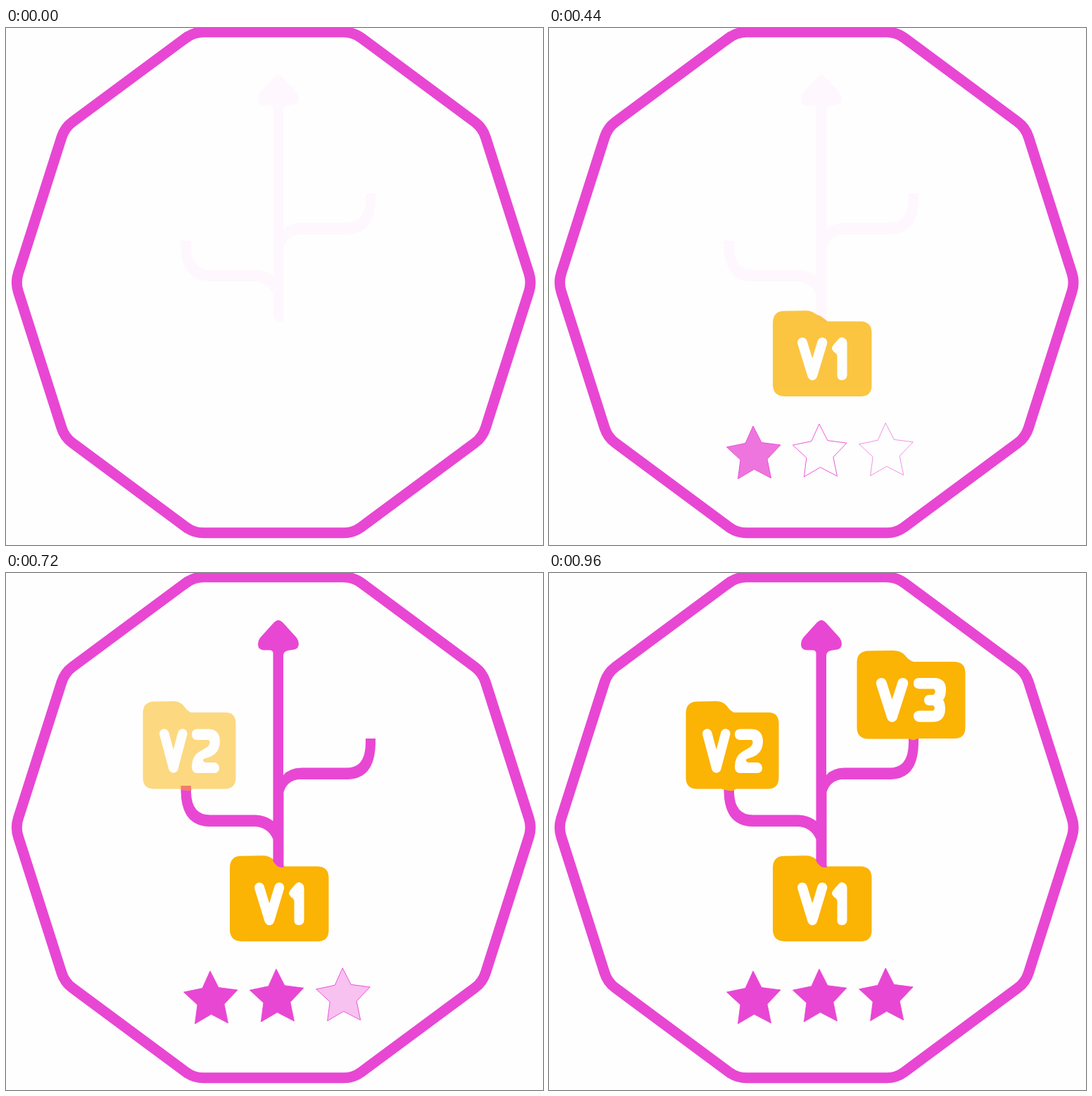
Write an HTML page that moves like this. It is 763x734 px and loops after 2880 ms.

```html
<!DOCTYPE html>
<html lang="en">
<head>
<meta charset="utf-8">
<title>Version branches</title>
<style>
  html, body { margin: 0; width: 100%; height: 100%; overflow: hidden; background: #fefefe; }
  svg { display: block; width: 100%; height: 100%; }
  .pink { fill: #e847d3; }
  .folder { fill: #fbb304; }
  .glyph { fill: #fff; }
  .vee { fill: none; stroke: #fff; stroke-linecap: round; stroke-linejoin: round; }
  .outline { fill: none; stroke: #e847d3; stroke-width: .9; }
  #frame { fill: none; stroke: #e847d3; stroke-width: 15; }
</style>
</head>
<body>
<svg viewBox="0 0 763 734" preserveAspectRatio="none">
  <path id="frame"/>
  <g id="stars"></g>
  <g id="v1" role="img" aria-label="V1">
    <path class="folder" d="M334 401.8L364 401.3Q373 401 379 406Q382 408 386 409L396 416.5L443 416.5Q458 417 458.5 432V508Q458 523 443 523H334Q318 522 318 506V418Q318.500 402 334 401.800Z"/>
    <path class="vee" stroke-width="14" d="M360 446.500L374.300 493L388.300 446.500"/>
    <path class="glyph" d="M416 439Q423 440 423.500 447V493Q423 500 416 500Q409.500 500 409.500 493V466Q409 462 405 460Q399 455 405 449L411 442Q413.500 439 416 439Z"/>
  </g>
  <path id="tree" class="pink" d="M387 67Q390 67 394 71L413 92Q416 96 416 101Q415 109 407 109L401 110Q394 111 394 118V287Q402 277 420 276.500H484Q511 277 511 240V235H525V242Q524 292 486 293H417Q400 294 394.500 311V418H391Q385 418 379.500 409V378Q372 361 354 360H288Q249 358 248.500 310V302H263V312Q264 343.500 290 343.500H355Q369 344 379.500 352V115Q380 110 375 109.500H366Q358 109 358 101Q358 96 361 92L380 71Q384 67 387 67Z"/>
  <g id="v2" role="img" aria-label="V2">
    <path class="folder" d="M210 182.500L238 182Q247 182 253 189Q257 196 263 198H312Q326 198 326.500 213V291Q326 306 312 306.500H266Q262 310 256 309Q250 308 245 306.500H210Q195 306 194.500 292V198Q195 183 210 182.500Z"/>
    <path class="vee" stroke-width="13.500" d="M224.800 228L237.800 277L250.800 228"/>
    <path class="glyph" d="M271 221.500H288Q304 222 304 240Q303 256 290 261L281 264Q278 267 283 269H297Q303 271 303 277Q303 284 296 284H270Q264 283 264 275Q264 259 276 253L286 247Q292 241 288 237H271Q264 236 264 229Q264 222 271 221.500Z"/>
  </g>
  <g id="v3" role="img" aria-label="V3">
    <path class="folder" d="M454 110.500L488 110Q500 110 506 117Q511 124 518 126H575Q591 126 591.500 141V220Q591 235 576 235H524Q518 239 512 235.500H453Q438 235 437.500 220V126Q438 111 454 110.500Z"/>
    <path class="vee" stroke-width="15" d="M472.300 156.500L487.500 204L502.700 156.500"/>
    <path class="glyph" d="M526 149H550Q564 151 564 165Q564 176 560 180Q563 185 563 194Q562 211 546 211.500H526Q518 210 518 203Q518 196 526 195.500H546Q550 192 546 188H540Q533 187 533 180.500Q533 174 540 173H546Q551 169 547 164.500H526Q518 164 518 157Q518 149 526 149Z"/>
  </g>
</svg>
<script>
const LOOP = 2880, STEP = 40;
const byId = id => document.getElementById(id);

// Closed polygon whose corners are softened over a distance `cut`.
function roundedPolygon(points, cut) {
  const n = points.length;
  const toward = ([x, y], [u, v]) => {
    const k = cut / Math.hypot(u - x, v - y);
    return [x + (u - x) * k, y + (v - y) * k];
  };
  return points.map((p, i) =>
    `${i ? 'L' : 'M'}${toward(p, points[(i + n - 1) % n])}Q${p} ${toward(p, points[(i + 1) % n])}`
  ).join('') + 'Z';
}

const corners = Array.from({ length: 10 }, (_, i) => {
  const a = i * Math.PI / 5;
  return [380.2 + 367 * Math.cos(a), 361.3 + 373.8 * Math.sin(a)];
});
byId('frame').setAttribute('d', roundedPolygon(corners, 14));

const STAR = 'M290 565L302 588.500L329 592L310 612L315.500 639L291.500 626.500L268.500 640L272 613L252.500 595L279 589.500Z';
[[0, 0], [93.9, -2.8], [188.2, -4.2]].forEach(([x, y], i) => {
  byId('stars').insertAdjacentHTML('beforeend',
    `<g transform="translate(${x} ${y})">
      <path id="fill${i}" class="pink" d="${STAR}"/>
      <path id="line${i}" class="outline" d="${STAR}"/>
    </g>`);
});

// [id, fade start, fade end, resting opacity]
const fades = [
  ['line0', 0, 160],
  ['line1', 160, 320],
  ['line2', 360, 480],
  ['fill0', 320, 480],
  ['v1', 320, 480],
  ['tree', 480, 640, .035],
  ['fill1', 520, 680],
  ['v2', 640, 800],
  ['fill2', 680, 800],
  ['v3', 800, 960]
].map(([id, from, to, rest = 0]) => ({ el: byId(id), from, to, rest }));

function draw(now) {
  const t = Math.floor(now % LOOP / STEP) * STEP;
  for (const { el, from, to, rest } of fades) {
    const ramp = Math.min(1, (t - from) / (to - from));
    el.setAttribute('opacity', Math.max(rest, ramp));
  }
}

let start;
function tick(now) {
  start ??= now;
  draw(now - start);
  requestAnimationFrame(tick);
}
draw(0);
requestAnimationFrame(tick);
</script>
</body>
</html>
```
